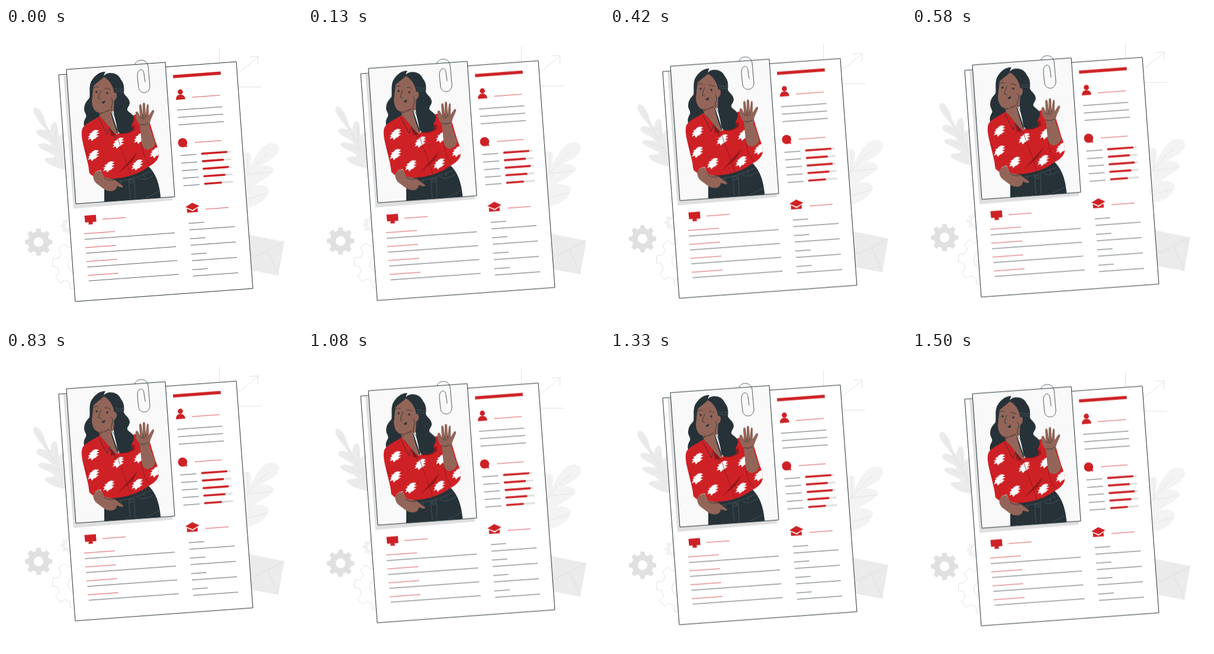
Recreate the animation shown at these times as an HTML page. Size 500 by 500 pixels, loop 1.54 s.

```html
<!DOCTYPE html>
<html lang="en">
<head>
<meta charset="utf-8">
<title>Floating résumé</title>
<style>
  html, body { margin: 0; width: 100%; height: 100%; overflow: hidden; background: #fff; }
  svg { display: block; width: 100vw; height: 100vh; }
  .ink { fill: none; stroke: #263238; stroke-width: .8; stroke-linecap: round; stroke-linejoin: round; }
  .pale { fill: none; stroke: #dedede; stroke-width: .9; }
  .red { fill: #ce2125; }
  .deep { fill: #94181b; }
  .skin { fill: #926558; }
  .dark { fill: #263238; }
</style>
</head>
<body>
<svg viewBox="0 0 500 500">
  <defs>
    <clipPath id="frame"><path d="M102 70 269 58 285 285 118 297Z"/></clipPath>
    <clipPath id="cloth"><use href="#shirt"/></clipPath>
    <path id="splash" d="M3-9 9-8 5-4 10-4 4 0 9 1 4 4 5 5 1 6-3 10-5 6-10 8-7 3-10 3-5-1-8-2-2-5-3-6Z"/>
    <path id="shirt" d="M158 149C147 156 135 161 130 168C126 175 128 186 131 199L139 232L141 246L151 242L160 240L166 254C190 257 222 249 241 234C249 230 256 224 258 216C259 207 255 198 252 190L243 160L222 147Q216 145 211 150L205 170L187 180Z"/>
  </defs>

  <g id="scene">
    <g id="backdrop">
      <path fill="#ebebeb" d="M47 136C52 131 60 140 64 150C67 158 69 168 75 173C75 165 79 158 84 159C90 164 86 178 90 184C93 178 96 177 100 180L104 240C88 238 70 231 65 223C67 217 77 221 83 217C76 209 58 207 54 198C58 192 69 196 77 197C72 187 53 185 51 176C53 169 61 171 68 174C63 164 54 158 50 149C47 144 45 140 47 136Z"/>
      <path fill="none" stroke="#e0e0e0" stroke-width=".7" d="M55 145Q76 185 101 226M65 175 82 190M84 170 85 196M67 200 92 208"/>
      <path fill="#f3f3f3" d="M398 215C406 207 414 210 414 217L413 232C420 220 427 205 439 197C448 192 462 194 461 205C460 217 445 224 431 232C440 230 452 234 452 240C448 252 431 256 419 267C429 263 444 267 444 275C441 291 422 302 400 305Z"/>
      <path fill="none" stroke="#e2e2e2" stroke-width=".8" d="M403 254Q420 230 443 211M405 248 452 243M407 289 442 279M408 211 409 246"/>
      <path class="pale" d="M360.5 33V66M386 66 395 74 426 49M411 49 426 48 425.5 62M385 99.5H431"/>
      <path fill="#ebebeb" d="M400 347 470 361 460 418 396 406Z"/>
      <path class="pale" d="M400 360 418 388 470 361M442 377 460 417"/>
    </g>

    <path fill="#fff" stroke="#263238" d="M89 79 389 57 417 440 117 462Z"/>
    <path fill="#dfdfdf" d="M97 79 265 67 282 291 114 305Z"/>
    <path fill="#f9f9f9" d="M102 70 269 58 285 285 118 297Z"/>

    <g clip-path="url(#frame)">
      <path class="dark" d="M168 74C157 74 147 82 143 93C140 101 142 111 142 117C138 122 132 126 132 137C132 143 137 146 135 151C131 157 130 164 134 170L190 178L160 88Z"/>
      <path class="dark" d="M166 255 241 234C253 246 261 264 262 300H166Z"/>
      <path fill="none" stroke="#4b5a61" stroke-width=".8" d="M167 263Q207 260 245 242M207 256 210 289M217 254 218 287M223 253Q232 260 249 249M236 287Q250 281 260 275M194 257 195 263M232 246 234 252"/>
      <circle cx="212" cy="259" r="3" fill="none" stroke="#56646b" stroke-width=".7"/>

      <use href="#shirt" class="red"/>
      <path class="deep" d="M193 171 217 164 218 172Q207 181 192 179ZM189 246 223 208 213 226ZM141 237 154 229 145 237 141 241ZM219 182 224 190 220 196Z"/>
      <g id="print" fill="#fff" clip-path="url(#cloth)"></g>
      <path fill="none" stroke="#8c171a" stroke-width=".8" d="M187 181Q193 200 201 220L211 249M133 203Q137 210 140 219M160 240Q155 234 151 232M229 193 232 211Q234 221 242 230"/>

      <path class="skin" d="M165 82C157 87 150 91 148 96L145 122C145 131 148 139 154 142C160 145 168 141 174 138L189 181 159 150 157 143 186 140 187 113 182 94Z"/>
      <path fill="#6d443a" d="M158 143Q167 144 175 137L175 140Q168 147 159 147Z"/>
      <path class="skin" d="M159 146 176 139 187 181 172 166Z"/>
      <path class="deep" d="M159 149 175 168 177 183 187 181 176 170Z"/>
      <path class="red" d="M158 149 174 167 171 180 156 153ZM174 169 187 182 190 164 188 183Z"/>
      <path class="ink" stroke-width=".7" d="M157 153 171 180 175 168 185 187"/>
      <path class="dark" d="M165 81C170 74 188 73 194 87C200 94 200 103 199 110C202 116 208 118 209 126C209 132 204 134 205 139C209 144 216 146 216 153C216 160 210 162 213 168C217 173 207 178 194 178Q188 177 187 166C186 158 182 148 182 139L183 117C184 104 177 88 165 83C160 88 151 94 147 99L145 122 141 120 143 92C148 83 156 74 167 74Z"/>
      <path class="skin" d="M179 112Q185 106 187 112Q188 121 181 123Z"/>
      <path class="ink" d="M178 118C184 126 176 131 178 138C180 146 186 148 186 158M160 106Q157 113 156 119L160 120"/>
      <path fill="none" stroke="#516068" stroke-width=".7" d="M183 102Q191 105 199 103M184 106Q192 109 199 107"/>
      <path class="ink" stroke-width="1.2" d="M148 101Q152 98 156 100M167 102Q172 101 176 104"/>
      <circle class="dark" cx="153" cy="108" r="1.8"/>
      <circle class="dark" cx="171" cy="110" r="1.8"/>
      <path class="dark" d="M160 125Q164 126 167 122L167 126Q164 129 162 126Z"/>

      <path class="skin" d="M147 247Q154 240 160 241L166 252 183 256 198 267Q198 270 194 269L187 267Q187 273 181 275Q172 277 164 271L152 262Q147 257 147 247Z"/>
      <path class="red" d="M140 234Q150 228 158 231L161 239Q150 241 147 250 140 248 140 234Z"/>
      <path class="ink" stroke-width=".5" d="M166 254Q173 258 182 257"/>

      <path class="skin" d="M226 163C220 158 218 150 219 142Q222 139 224 144L226 149 225 131Q227 126 229 131L231 146 231 128Q233 124 235 128L236 146 238 130Q240 127 241 131L241 148 247 139Q251 137 250 142L244 156Q243 161 242 165L252 194Q251 203 239 206Q230 204 229 193Z"/>
      <path class="ink" stroke="#633d34" stroke-width=".5" d="M226 150Q229 154 234 153M231 147 232 151M236 147 236 151M227 163Q234 165 241 161"/>
    </g>
    <path fill="none" stroke="#263238" d="M102 70 269 58 285 285 118 297Z"/>
    <path class="ink" d="M218 61C220 53 237 50 240 64L243 97C244 112 226 113 224 101L222 82C221 69 232 66 233 77L235 91"/>

    <path class="red" d="M282 79.5 362.5 73.5 363 78.8 282.4 84.8Z"/>
    <g id="icons" class="red">
      <circle cx="294.5" cy="108" r="4.4"/>
      <path d="M287 121.5Q287 113 294 112.5 302 112 303 120.3Z"/>
      <circle cx="298.3" cy="193.7" r="7.8"/>
      <path d="M304 195 306.5 201 299 200Z"/>
      <path d="M303 302.5 314.5 295.3 326.5 300.5 315.5 307.3ZM305.5 305 315.5 309.5 323.5 303.8 324 310.7 306 312Z"/>
      <path d="M132.5 317 151.8 315.6 152.7 327.2 133.6 328.6ZM140 327 146 326.5 147 331.5 139.3 332Z"/>
    </g>
    <g id="rules"></g>
  </g>
</svg>
<script>
const $ = id => document.getElementById(id);
const SLOPE = -0.0725, RED = '#ce2125', INK = '#263238';

function add(parent, tag, attrs) {
  const el = document.createElementNS('http://www.w3.org/2000/svg', tag);
  for (const key in attrs) el.setAttribute(key, attrs[key]);
  parent.appendChild(el);
}

// Every rule follows the tilt of the sheet.
function rule(x, y, len, stroke = INK, width = .75, cap = 'butt') {
  add($('rules'), 'path', {
    d: `M${x} ${y}l${len} ${len * SLOPE}`, stroke, 'stroke-width': width, 'stroke-linecap': cap
  });
}

function cog(cx, cy, r, teeth, attrs, turn = 0) {
  const step = 2 * Math.PI / teeth, pts = [];
  for (let i = 0; i < teeth; i++)
    for (const [a, k] of [[-.31, .78], [-.2, 1], [.2, 1], [.31, .78]]) {
      const t = turn + (i + a) * step;
      pts.push((cx + r * k * Math.cos(t)).toFixed(1) + ' ' + (cy + r * k * Math.sin(t)).toFixed(1));
    }
  const h = r * .35;
  const hole = `M${cx - h} ${cy}a${h} ${h} 0 1 0 ${2 * h} 0a${h} ${h} 0 1 0 ${-2 * h} 0Z`;
  add($('backdrop'), 'path', { d: `M${pts.join('L')}Z${hole}`, 'fill-rule': 'evenodd', ...attrs });
}

cog(55, 361.5, 23.3, 8, { fill: '#e0e0e0' });
cog(106, 334, 14, 8, { fill: '#f2f2f2' });
cog(119, 400, 41, 8, { class: 'pale' }, .1);

for (const [x, y, len] of [[314, 117, 47], [319, 193.3, 45], [337, 306, 39], [163, 323, 39]])
  rule(x, y, len, RED);
for (let i = 0; i < 3; i++) rule(289 + i * 1.3, 138.6 + i * 12.5, 76.5);

[[41, 48], [34, 48], [41, 47.5], [34, 47.5], [27, 47]].forEach(([value, full], i) => {
  const x = 331.3 + i * 1.25, y = 212.3 + i * 12.7;
  rule(294.5 + i * 1.35, 215.5 + i * 12.75, 27);
  rule(x, y, full, '#e0e0e0', 3.2);
  rule(x, y, value, RED, 3.4, 'round');
});

for (let i = 0; i < 4; i++) {
  rule(308.7 + i * 2, 330 + i * 26.1, 26);
  rule(310 + i * 2, 341 + i * 26, 76);
  rule(132 + i * 2, 347.5 + i * 23.5, 52, RED);
  rule(133 + i * 2.2, 357 + i * 23.4, 152);
}

for (const [x, y] of [[148, 181], [190, 194], [148, 215], [174, 234], [222, 231], [253, 210], [226, 186]])
  add($('print'), 'use', { href: '#splash', x, y });

// The whole scene rises and sinks at a constant speed.
$('scene').animate([
  { offset: 0, transform: 'translateY(0px)' },
  { offset: 717 / 1540, transform: 'translateY(-9.3px)' },
  { offset: 1487 / 1540, transform: 'translateY(.7px)' },
  { offset: 1, transform: 'translateY(0px)' }
], { duration: 1540, iterations: Infinity, easing: 'linear' });
</script>
</body>
</html>
```
